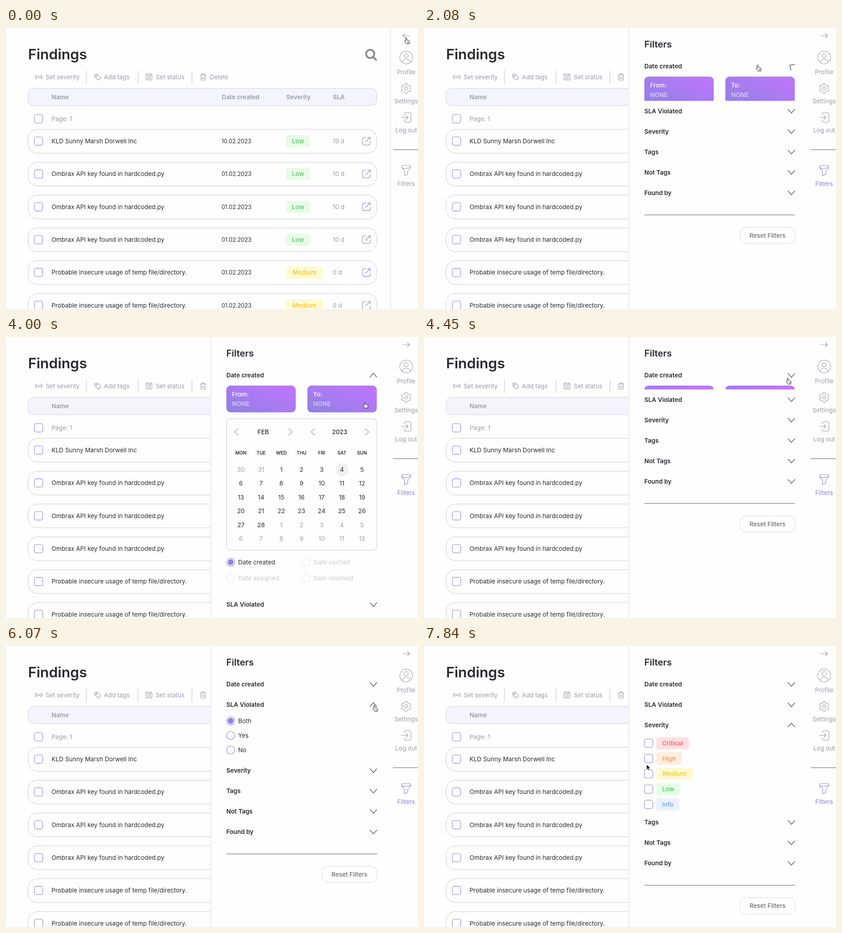
An HTML page for the animation above (7990 ms loop, 905 by 619 pixels).

```html
<!DOCTYPE html>
<html lang="en">
<head>
<meta charset="utf-8">
<title>Findings filters</title>
<style>
html, body { margin: 0; width: 100%; height: 100%; overflow: hidden; background: #fefefe; }
#stage { display: block; font: 13.4px Inter, "Open Sans", sans-serif; fill: #2b2930; }
text { stroke: none; white-space: pre; }
.gray { fill: #9a9cab; }
.bold { font-weight: 600; }
.mid { text-anchor: middle; }
.icon { fill: none; stroke: #9a9cab; stroke-width: 1.1; stroke-linecap: round; stroke-linejoin: round; }
.violet { stroke: #8b7fe0; }
.dark { stroke: #333; }
.card { fill: #fefefe; stroke: #c9cad6; }
.on .icon { stroke: #8b7fe0; }
.on text { fill: #8b7fe0; }
</style>
</head>
<body>
<svg id="stage" width="905" height="619"></svg>
<script>
const LOOP = 7990, TICK = 148;
const stage = document.getElementById('stage');

// Markup helpers; y is the vertical centre of a line of text.
const text = (x, y, s, cls = '', more = '') =>
  `<text x="${x}" y="${y + 4.8}" class="${cls}" ${more}>${s}</text>`;
const rect = (x, y, w, h, r, more) =>
  `<rect x="${x}" y="${y}" width="${w}" height="${h}" rx="${r}" ${more}/>`;
const icon = (x, y, d, cls = '', more = '') =>
  `<path transform="translate(${x} ${y})" class="icon ${cls}" d="${d}" ${more}/>`;
const ring = (x, y, r, more) => `<circle cx="${x}" cy="${y}" r="${r}" ${more}/>`;
const circlePath = r => `M${-r} 0a${r} ${r} 0 1 0 ${2 * r} 0a${r} ${r} 0 1 0 ${-2 * r} 0`;
const each = (list, f) => list.map(f).join('');

const checkbox = (x, y) => rect(x - 9.2, y - 9.2, 18.4, 18.4, 4, 'class="icon violet"');
const radio = (x, y, label, state) =>
  ring(x, y, 9, `fill="none" stroke="${state == 'off' ? '#e2dff6' : '#8b7fe0'}" stroke-width="1.1"`) +
  (state == 'set' ? ring(x, y, 6.5, 'fill="#8f84e4"') : '') +
  text(x + 16.5, y, label, '', state == 'off' ? 'fill="#c9cad0"' : '');

const LEVELS = {
  Critical: [72, '#ffe1e2', '#f9686d'],
  High: [57, '#ffeedd', '#ff9a62'],
  Medium: [81, '#fffad0', '#f6ca42'],
  Low: [53, '#e8fce5', '#62cd7e'],
  Info: [51, '#eaf2ff', '#7ba7f7'],
};
const badge = (x, y, name) => {
  const [w, back, ink] = LEVELS[name];
  return rect(x, y - 13.5, w, 27, 5, `fill="${back}"`) +
    text(x + w / 2, y, name, 'bold mid', `fill="${ink}"`);
};

const findings = [
  ['KLD Sunny Marsh Dorwell Inc', '10.02.2023', 'Low', '19 d'],
  ...Array(3).fill(['Ombrax API key found in hardcoded.py', '01.02.2023', 'Low', '10 d']),
  ...Array(2).fill(['Probable insecure usage of temp file/directory.', '01.02.2023', 'Medium', '0 d']),
];

const SHARE = 'M-1-8H-5q-3.5 0-3.5 3.5V4.5q0 4 3.5 4H5q3.5 0 3.5-4V1M-1.5 1.5 8.5-8.5M3-8.5H8.5V-3';
const row = ([name, date, level, sla], i) => {
  const y = 249.2 + 72.35 * i;
  return rect(48.5, y - 26, 766, 52.5, 21, 'class="card"') + checkbox(71.5, y) +
    text(100, y, name) + text(473.5, y, date, '', 'font-size="12.4"') +
    badge(615, y, level) + text(717.5, y, sla, 'gray') + icon(791.5, y, SHARE, 'violet');
};

const tools = [
  [72, 87, 'Set severity', circlePath(1.6) + 'M-4-3.2q-2 3.2 0 6.4M4-3.2q2 3.2 0 6.4M-6.3-4.5q-2 4.5 0 9M6.3-4.5q2 4.5 0 9'],
  [201, 215, 'Add tags', 'M-6.5-5.5 0-6.7 6.5 0.5q1 1 0 2L3 6q-1 1-2 0L-6 0ZM-3.8-2.5a1.6 1.6 0 1 0 3.2 0a1.6 1.6 0 1 0-3.2 0'],
  [314, 329, 'Set status', 'M-6.5-6.5H5L6.5-5V6.5H-6.5ZM-3.5-6.5V-2H3.5V-6.5M1.5-5V-3.5M-3.5 1H3.5M-3.5 3.7H3.5'],
  [433, 448, 'Delete', 'M-6-4.5H6M-2.5-4.5V-7H2.5V-4.5M-4.8-4.5V5q0 2 2 2H2.8q2 0 2-2V-4.5M-1.5-1V4M1.5-1V4'],
];

const page =
  text(48.5, 64.5, 'Findings', 'bold', 'font-size="31.3"') +
  icon(800, 57, circlePath(9) + 'M6.5 6.5 13 13', '', 'style="stroke:#8d8d8d;stroke-width:4"') +
  each(tools, ([x, tx, label, d]) => icon(x, 108, d) + text(tx, 108, label, 'gray')) +
  icon(0, 94, 'M176.5 0v29M290 0v29M408.5 0v29', '', 'style="stroke:#c5c6d3"') +
  rect(48.5, 133, 766, 38, 12, 'fill="#f4f4fd" stroke="#cfcfe2"') +
  each([[100, 'Name'], [474, 'Date created'], [615.5, 'Severity'], [718, 'SLA']],
    ([x, s]) => text(x, 152, s, 'bold gray')) +
  checkbox(71.5, 200) + text(100, 200, 'Page: 1', 'gray') + each(findings, row);

// Sidebar
const gear = 'M' + Array.from({ length: 73 }, (_, i) => {
  const a = i * Math.PI / 36, r = 9.6 + 1.5 * Math.cos(6 * a);
  return `${(r * Math.sin(a)).toFixed(1)} ${(-r * Math.cos(a)).toFixed(1)}`;
}).join('L') + 'Z';
const sidebar =
  icon(879, 17, 'M-7.5 0H7.5M-2.5-5-7.5 0-2.5 5', '', 'id="arrow"') +
  icon(879, 65, circlePath(14) + 'M-4.5-4a4.5 4.5 0 1 0 9 0a4.5 4.5 0 1 0-9 0M-8.5 10.5Q-8 3.5 0 3.5T8.5 10.5') +
  icon(879, 133, gear) + icon(879, 133, circlePath(3.5)) +
  icon(879, 197, 'M-4-5V-7q0-3.500 3.500-3.500H6.500q4 0 4 4V6.500q0 4-4 4H-.5Q-4 10.500-4 7V5M-10.500 0H4M0-4 4 0 0 4') +
  each([[97, 'Profile'], [161, 'Settings'], [225.5, 'Log out']], ([y, s]) => text(879, y, s, 'gray mid')) +
  rect(850, 267.3, 55, 1.6, 0, 'fill="#8f93a8"') +
  '<g id="filters">' +
  icon(879, 314, 'M-8-11H8q2 0 2 2V-6L3.5 1.500V8.500L-3.500 11.500V1.500L-10-6V-9q0-2 2-2ZM-10-6.500Q-4-3 0-4.500T10-6.500') +
  text(879, 343, 'Filters', 'gray mid') + '</g>';

// Filter sections, in coordinates relative to the top of each section's body
const dayX = c => 516 + 44.35 * c, dayY = r => 185 + 30.5 * r;
const days = Array.from({ length: 42 }, (_, i) => {
  const n = i - 1, inMonth = n > 0 && n < 29;
  return text(dayX(i % 7), dayY(i / 7 | 0), inMonth ? n : n > 0 ? n - 28 : n + 31, inMonth ? 'mid' : 'gray mid');
}).join('');
const dateBox = (x, label) =>
  rect(x, 0, 152.5, 59, 9, 'fill="url(#violet)"') +
  text(x + 12.5, 19, label, '', 'fill="#fff" font-weight="500"') +
  text(x + 12.5, 40, 'NONE', 'bold', 'fill="#fff" fill-opacity=".58"');
const calendar =
  dateBox(484, 'From:') + dateBox(662, 'To:') +
  rect(484.5, 73, 330, 289.5, 9, 'class="card"') +
  each([506, 674], x => icon(x, 102, 'M4-7-4 0 4 7')) +
  each([625, 793], x => icon(x, 102, 'M-4-7 4 0-4 7')) +
  text(565, 102, 'FEB', 'mid', 'font-weight="500"') + text(733, 102, '2023', 'mid', 'font-weight="500"') +
  each(['MON', 'TUE', 'WED', 'THU', 'FRI', 'SAT', 'SUN'],
    (s, i) => text(dayX(i), 147, s, 'bold mid', 'font-size="10"')) +
  ring(0, 0, 14.5, 'id="hover" fill="#f1f1f3"') + days +
  radio(493.5, 389, 'Date created', 'set') + radio(659, 389, 'Date verified', 'off') +
  radio(493.5, 424.5, 'Date assigned', 'off') + radio(659, 424.5, 'Date resolved', 'off');

const sections = [
  { name: 'Date created', height: 460, open: 2011, close: 4166, body: calendar },
  { name: 'SLA Violated', height: 100, open: 4950, close: 6290,
    body: each(['Both', 'Yes', 'No'], (s, i) => radio(493.5, 12.8 + 32.2 * i, s, i ? '' : 'set')) },
  { name: 'Severity', height: 169, open: 6785, close: LOOP * 2,
    body: each(Object.keys(LEVELS), (s, i) => checkbox(493.5, 17 + 33.75 * i) + badge(510, 17 + 33.75 * i, s)) },
  ...['Tags', 'Not Tags', 'Found by'].map(name => ({ name, height: 0, open: LOOP * 2, close: LOOP * 2, body: '' })),
];

const panel = text(484, 38.2, 'Filters', 'bold', 'font-size="20"') +
  each(sections, (s, i) => `<g class="section">${text(484, 84.2 + 45 * i, s.name, 'bold')}
    <svg y="${107 + 45 * i}" width="905" height="0">${s.body}</svg>
    ${icon(807, 84.3 + 45 * i, 'M-7.5-4 0 4.500 7.5-4', 'dark')}</g>`) +
  '<g id="foot">' + rect(484, 357.3, 331, 1.6, 0, 'fill="#8f93a8"') +
  rect(694.5, 385.5, 120, 36, 12, 'fill="#fefefe" stroke="#dadae1"') +
  text(754.5, 403.5, 'Reset Filters', 'mid', 'fill="#6c6c72" font-weight="500"') + '</g>';

stage.innerHTML = `<defs>
  <linearGradient id="violet" x1="0" y1="1" x2="1" y2="0">
    <stop stop-color="#8f82e2"/><stop offset="1" stop-color="#c274ff"/></linearGradient>
  <clipPath id="reveal"><rect id="window" width="905" height="619"/></clipPath></defs>
  ${page}
  <g id="drawer">${rect(-2.5, 0, 3, 619, 0, 'fill="#ececf1"')}${rect(0, 0, 905, 619, 0, 'fill="#fefefe"')}</g>
  <g clip-path="url(#reveal)">${panel}</g>${sidebar}
  <g id="cursor" stroke-linejoin="round">
    <path id="hand" fill="#fff" stroke="#222" d="M-3.2 1.500V-5.300q0-1.400 1.200-1.400t1.200 1.400V-1.300l1.800.1 1.800.5 1.600.6q1.200.5 1.200 2.200l-.7 2.600V7H-1.500q-.6-1.800-3.300-4.300-1.100-1.500 0-2 .9-.2 1.600.8ZM1 2.500V5M3 2.500V5"/>
    <path id="pointer" fill="#111" stroke="#fff" stroke-width=".8" d="M0 0V11.500l2.700-2.500 1.900 4.300 2-.9-1.900-4.200h3.700Z"/>
  </g>`;

const $ = id => document.getElementById(id);
const groups = [...document.querySelectorAll('.section')];
const move = (el, x, y) => el.setAttribute('transform', `translate(${x} ${y})`);

// The CSS "ease" curve, solved by bisection.
function ease(p) {
  if (p <= 0 || p >= 1) return p <= 0 ? 0 : 1;
  let a = 0, b = 1, u;
  for (let i = 0; i < 16; i++) {
    u = (a + b) / 2;
    if (.75 * u - .75 * u * u + u ** 3 < p) a = u; else b = u;
  }
  return .3 * u * (1 - u) ** 2 + 3 * u * u * (1 - u) + u ** 3;
}

// Cursor path: tick, x, y
const path = [
  [0, 881, 28], [9, 881, 28], [12, 735, 88], [16, 735, 88], [18, 610, 355], [19, 616, 401],
  [21, 640, 380], [23, 600, 490], [25, 700, 480], [27, 790, 150], [28, 801, 97], [31, 801, 97],
  [32, 808, 137], [36, 808, 137], [37, 770, 160], [39, 820, 137], [40, 820, 137], [41, 811, 137],
  [43, 811, 137], [45, 809, 181], [47, 809, 181], [48, 771, 181], [49, 771, 181],
  [51, 500, 287], [52, 437, 270], [53, 489, 261],
];
function cursorAt(tick) {
  const i = Math.max(1, path.findIndex(p => p[0] >= tick));
  const [t0, x0, y0] = path[i - 1], [t1, x1, y1] = path[i], f = (tick - t0) / (t1 - t0);
  return [x0 + (x1 - x0) * f, y0 + (y1 - y0) * f];
}

function draw(ms) {
  const tick = Math.min(53, Math.floor((ms + 5) / TICK)), t = tick * TICK;

  const edge = 846 - 395 * ease((t - 856) / 300), opened = t >= 856;
  move($('drawer'), edge, 0);
  $('window').setAttribute('x', edge);
  $('filters').setAttribute('class', opened ? 'on' : '');
  $('arrow').setAttribute('transform', `translate(879 17) scale(${opened ? -1 : 1} 1)`);

  let shift = 0;
  sections.forEach((s, i) => {
    const span = (delay, time) => ease((t - s.open - delay) / time) - ease((t - s.close - delay) / time);
    const size = s.height * span(27, 300);
    const [body, chevron] = [groups[i].querySelector('svg'), groups[i].lastElementChild];
    move(groups[i], 0, shift);
    body.setAttribute('height', size);
    chevron.setAttribute('transform', `translate(807 ${84.3 + 45 * i}) rotate(${180 * span(0, 150)})`);
    shift += size;
  });
  move($('foot'), 0, shift);

  const pointing = tick < 50;
  move($('cursor'), ...cursorAt(tick));
  $('hand').style.display = pointing ? '' : 'none';
  $('pointer').style.display = pointing ? 'none' : '';

  // The highlighted day trails the cursor a little.
  const [x, y] = cursorAt(Math.max(0, tick - .9));
  const col = Math.round((x - 520) / 44.35), line = Math.round((y - 299) / 30.5);
  const inside = col >= 0 && col < 7 && line >= 0 && line < 6;
  move($('hover'), dayX(col), dayY(line));
  $('hover').style.display = inside && Math.abs(x - 4 - dayX(col)) < 15 ? '' : 'none';
}

const start = performance.now();
function frame() {
  draw((performance.now() - start) % LOOP);
  requestAnimationFrame(frame);
}
frame();
</script>
</body>
</html>
```
